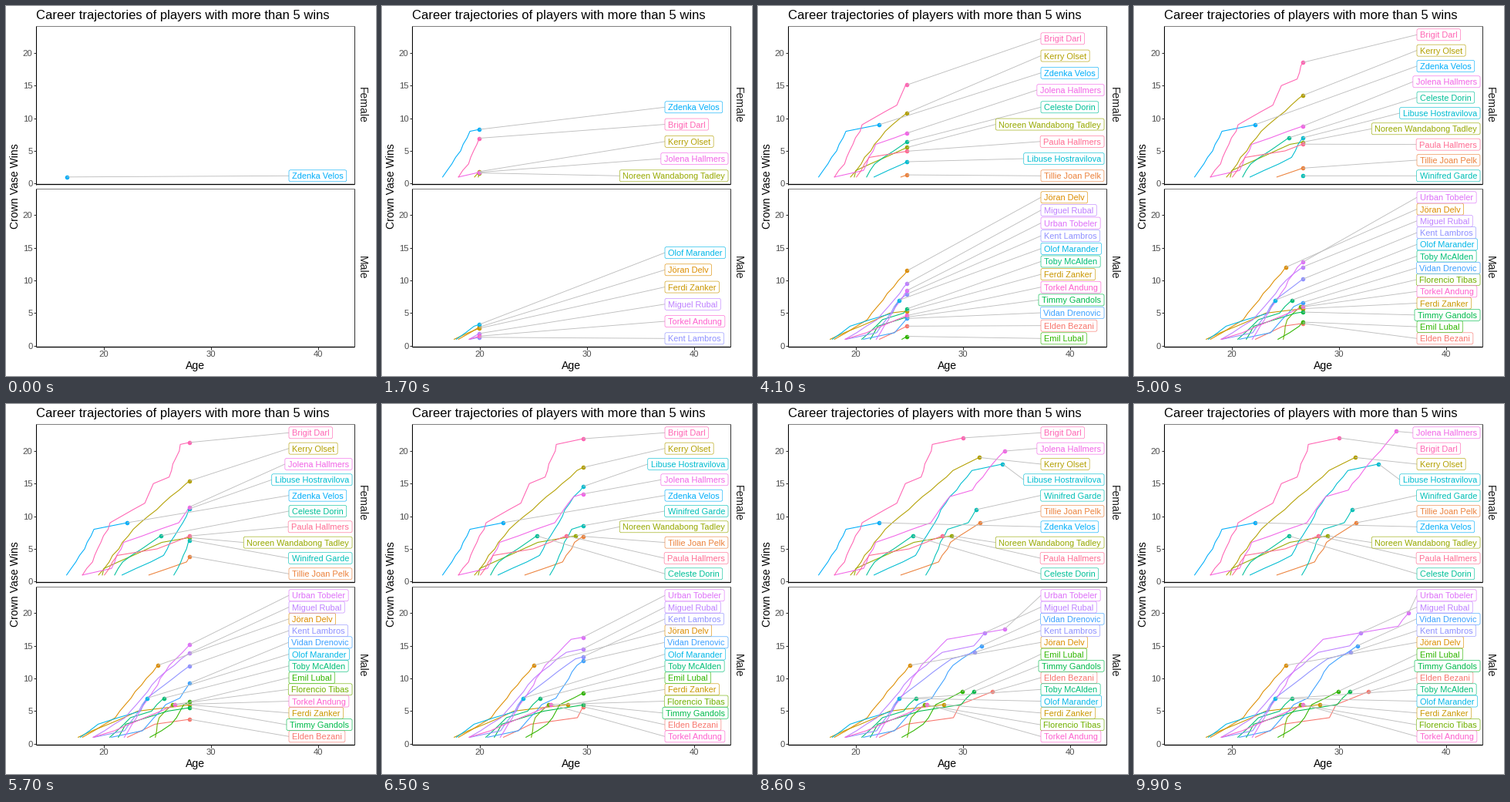
A matplotlib script for the animation above (10000 ms loop, 480x480 px).

```python
import numpy as np
import matplotlib.pyplot as plt
from matplotlib.animation import FuncAnimation
from matplotlib.patches import FancyBboxPatch

SIZE, FRAMES, INTERVAL = 480, 100, 100
AGE_START, AGE_END = 16.52, 36.47
YEAR, WIN = 13.9, 8.47            # pixels per unit
F, M = 0, 1
BASE = (230.3, 440.8)             # y of zero wins in each panel
LAST_LABEL = (220.3, 431.3)
LABEL_GAP, LABEL_SPAN = 22.25, 183
PLAYERS = 23

plt.rcParams["font.family"] = "Liberation Sans"
fig = plt.figure(figsize=(SIZE / 72, SIZE / 72), dpi=72, facecolor="white")
ax = fig.add_axes([0, 0, 1, 1])
ax.set_xlim(0, SIZE)
ax.set_ylim(SIZE, 0)
ax.axis("off")
rng = np.random.default_rng(5)


def px(age):
    return 127 + YEAR * (np.asarray(age) - 20)


def py(wins, panel):
    return BASE[panel] - WIN * np.asarray(wins)


def hue(i):
    """Evenly spaced hue in polar LUV, chroma 100, luminance 65."""
    h = np.radians(15 + 360 * i / PLAYERS)
    u = 100 * np.cos(h) / (13 * 65) + 0.1978
    v = 100 * np.sin(h) / (13 * 65) + 0.4683
    y = ((65 + 16) / 116) ** 3
    xyz = [y * 9 * u / (4 * v), y, y * (12 - 3 * u - 20 * v) / (4 * v)]
    rgb = np.array([[3.2406, -1.5372, -0.4986],
                    [-0.9689, 1.8758, 0.0415],
                    [0.0557, -0.2040, 1.0570]]) @ xyz
    rgb = np.clip(rgb, 0, 1)
    return np.where(rgb > 0.00304, 1.055 * rgb ** (1 / 2.4) - 0.055, 12.92 * rgb)


def rule(x0, y0, x1, y1, color="black", lw=1.07, z=1):
    return ax.plot([x0, x1], [y0, y1], color=color, lw=lw, zorder=z,
                   solid_capstyle="butt")[0]


def draw_frame():
    for panel, top, bottom, name in ((F, 26.4, 231.2, "Female"), (M, 236.7, 441.7, "Male")):
        rule(39, top, 452, top, "#808080", 1)
        rule(451.6, top, 451.6, bottom, "#333333", 1)
        rule(39.4, top, 39.4, bottom + 0.5)
        rule(39, bottom, 452, bottom, lw=1.3)
        for w in range(0, 21, 5):
            y = py(w, panel)
            rule(35.8, y, 39, y, "#333333")
            ax.text(34.6, y + 4, str(w), size=11.2, color="#4D4D4D", ha="right")
        ax.text(461.5, (top + bottom) / 2, name, size=14, color="#1A1A1A",
                rotation=-90, ha="center", va="center")
    for age in (20, 30, 40):
        rule(px(age), 442, px(age), 445.5, "#333333")
        ax.text(px(age), 455.4, str(age), size=11.2, color="#4D4D4D", ha="center")
    ax.text(39.4, 17.4, "Career trajectories of players with more than 5 wins", size=16.67)
    ax.text(245, 471, "Age", size=14, ha="center")
    ax.text(12.3, 233.5, "Crown Vase Wins", size=14, rotation=90,
            ha="center", va="center")


class Player:
    """A career from the first win through a few (age, wins) turning points."""

    def __init__(self, name, panel, debut, *turns):
        i = len(roster)
        color = hue(i)
        turn_ages, turn_wins = zip((debut, 1), *turns)
        self.panel = panel
        self.wins = np.arange(1, turn_wins[-1] + 1)
        self.ages = np.interp(self.wins, turn_wins, turn_ages)
        self.ages[1:-1] += rng.uniform(-0.09, 0.09, len(self.wins) - 2)
        self.ages.sort()
        self.trail, = ax.plot([], [], color=color, lw=1.07, zorder=2)
        self.dot, = ax.plot([], [], "o", color=color, ms=5.6, mew=0, zorder=3)
        self.link = rule(0, 0, 0, 0, "#BEBEBE", 0.9, 4)
        z = 5 + i / 10
        self.text = ax.text(0, 0, name, size=11.04, color=color, zorder=z + 0.05)
        width = self.text.get_window_extent(fig.canvas.get_renderer()).width
        self.x = min(371, 445 - width)
        self.box = FancyBboxPatch((self.x - 4, 0), width + 8, 15,
                                  boxstyle="round,pad=0,rounding_size=2.1",
                                  fc="white", ec=color, lw=0.6, zorder=z)
        ax.add_patch(self.box)
        self.parts = (self.trail, self.dot, self.link, self.text, self.box)
        roster.append(self)

    def value(self, age):
        return np.interp(age, self.ages, self.wins)

    def lift(self, age, label_y):
        """Retired players' links fan out: up for labels above the dot, else down."""
        lag = max(age - self.ages[-1], 0)
        return 0.28 * lag * np.tanh((py(self.value(age), self.panel) - label_y) / 20)

    def draw(self, age, label_y):
        end = min(age, self.ages[-1])
        past = self.ages < end
        xs = px(np.append(self.ages[past], end))
        ys = py(np.append(self.wins[past], self.value(end)), self.panel)
        self.trail.set_data(xs, ys)
        self.dot.set_data(xs[-1:], ys[-1:])
        self.link.set_data([xs[-1], self.x - 4], [ys[-1], label_y])
        self.text.set_position((self.x, label_y + 4))
        self.box.set_y(label_y - 7.5)


roster = []
Player("Elden Bezani", M, 22.2, (24.7, 3), (29.1, 4), (29.8, 6), (32.75, 8))
Player("Tillie Joan Pelk", F, 24.2, (27.8, 3), (28.8, 6), (31.6, 9))
Player("Jöran Delv", M, 18, (21, 4), (23, 8), (25, 12))
Player("Ferdi Zanker", M, 17.6, (21.8, 4), (23.2, 5), (28.2, 6))
Player("Kerry Olset", F, 19.5, (22.75, 8), (29.1, 17), (31.5, 19))
Player("Noreen Wandabong Tadley", F, 19.85, (19.95, 2), (25.5, 6), (28.95, 7))
Player("Florencio Tibas", M, 24.8, (25.1, 4), (26.4, 6))
Player("Emil Lubal", M, 24.3, (26.3, 3), (27.5, 6), (29.9, 8))
Player("Timmy Gandols", M, 21.35, (22, 3), (26, 5), (29.8, 6), (31, 8))
Player("Toby McAlden", M, 20.55, (22.5, 4), (24.4, 5), (25.6, 7))
Player("Celeste Dorin", F, 21, (21.7, 3), (25.3, 7))
Player("Winifred Garde", F, 26.53, (28.5, 8), (30.5, 9), (31.2, 11))
Player("Libuse Hostravilova", F, 21.7, (25.6, 4), (28.3, 12), (30.9, 17), (33.7, 18))
Player("Olof Marander", M, 17.8, (19.4, 3), (23.4, 5), (24.05, 7))
Player("Zdenka Velos", F, AGE_START, (17.8, 4), (19.15, 8), (22.15, 9))
Player("Vidan Drenovic", M, 20.7, (23.7, 2), (25.7, 6), (27.1, 7), (29, 12), (31.7, 15))
Player("Kent Lambros", M, 19.1, (21.9, 2), (24.1, 7), (28.9, 13), (31.1, 14))
Player("Miguel Rubal", M, 19, (22, 4), (25, 10), (28, 14), (31, 15), (32, 17))
Player("Urban Tobeler", M, 21.9, (26.1, 12), (28.5, 16), (35.5, 18), (AGE_END, 20))
Player("Jolena Hallmers", F, 18, (20.7, 2), (21.8, 6), (27, 9), (28.8, 13), (30.8, 14),
       (35.35, 23))
Player("Torkel Andung", M, 19, (21, 2), (26.65, 6))
Player("Brigit Darl", F, 18, (18.9, 3), (20.6, 9), (23.9, 12), (24.6, 15), (26, 16),
       (27.2, 21), (30, 22))
Player("Paula Hallmers", F, 20.05, (21.2, 4), (25, 5), (28.05, 7))


def stack(players, panel, age):
    """Pair players with evenly spaced label heights, best on top."""
    n = len(players)
    gap = min(LABEL_GAP, LABEL_SPAN / max(n - 1, 1))
    heights = LAST_LABEL[panel] - gap * np.arange(n - 1, -1, -1)
    ranked = sorted(players, key=lambda p: -p.value(age))
    score = {p: p.value(age) + p.lift(age, y) for p, y in zip(ranked, heights)}
    return zip(sorted(ranked, key=score.get, reverse=True), heights)


def update(frame):
    age = AGE_START + (AGE_END - AGE_START) * frame / (FRAMES - 1)
    started = [p for p in roster if age >= p.ages[0]]
    for p in roster:
        for part in p.parts:
            part.set_visible(p in started)
    for panel in (F, M):
        for p, y in stack([p for p in started if p.panel == panel], panel, age):
            p.draw(age, y)
    return []


draw_frame()
anim = FuncAnimation(fig, update, frames=FRAMES, interval=INTERVAL,
                     repeat=True, repeat_delay=0, blit=False)
plt.show()
```
